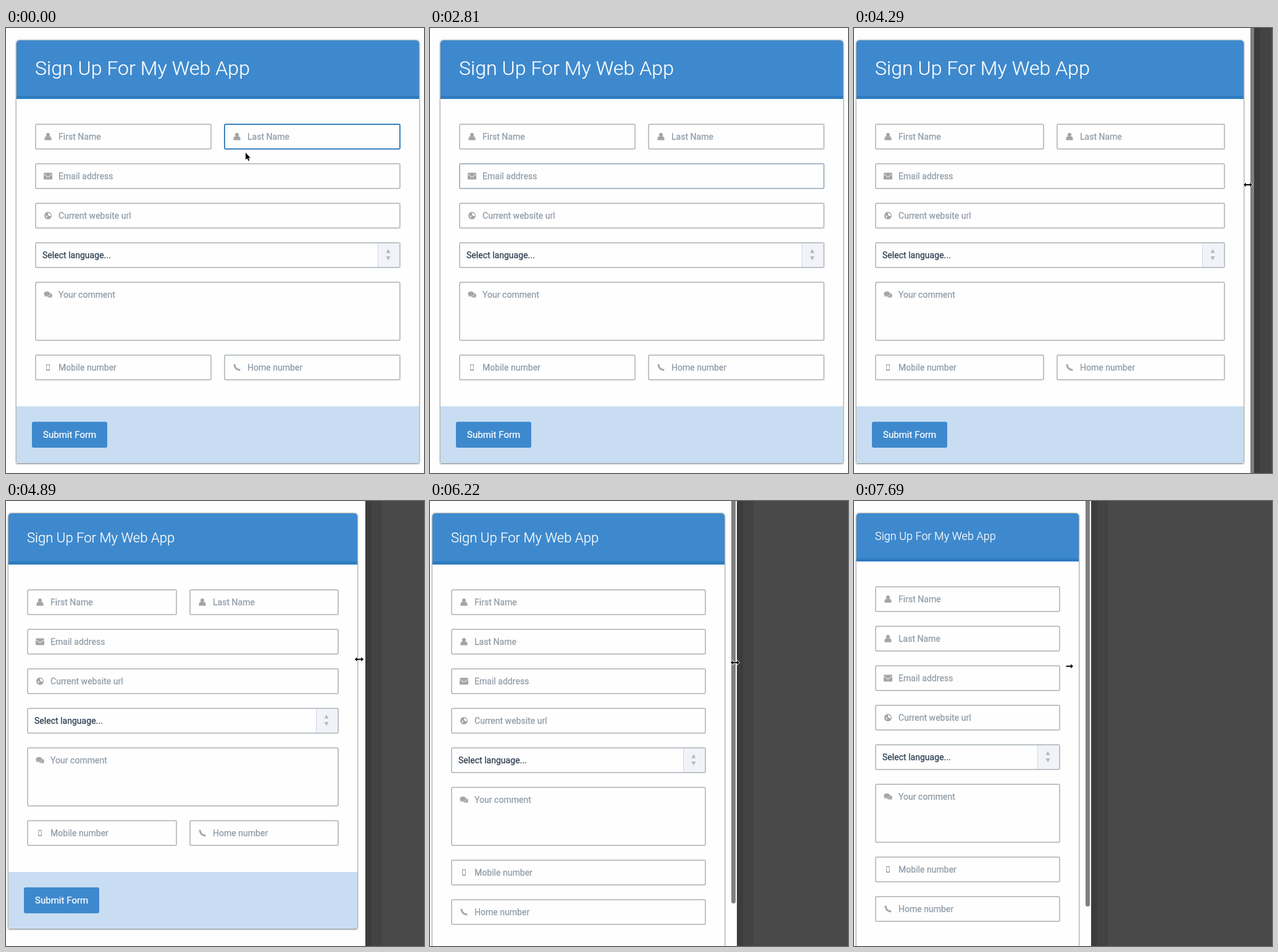
Animation, 677 px wide and 721 px high, one loop 8 s. Source, as an HTML page:

```html
<!DOCTYPE html>
<html lang="en">
<head>
<meta charset="utf-8">
<title>Responsive sign-up form</title>
<style>
  html, body { margin: 0; width: 100%; height: 100%; overflow: hidden; background: #fefefe; }
  svg { display: block; width: 100vw; height: 100vh; font: 14px Roboto, sans-serif; }
  text { stroke-width: .25px; letter-spacing: .002em; }
</style>
</head>
<body>
<svg viewBox="0 0 677 721">
  <defs>
    <filter id="shadow" x="-5%" y="-5%" width="110%" height="110%">
      <feDropShadow dx="0" dy="0.4" stdDeviation="1.4" flood-color="#000" flood-opacity=".8"/>
    </filter>
  </defs>
  <g id="page"></g>
  <g id="overlay"></g>
</svg>
<script>
const LOOP = 8000, TICK = 148, LAST = 52;
const PAPER = '#fefefe', BLUE = '#3e89cd';
const page = document.getElementById('page');
const overlay = document.getElementById('overlay');

const ICONS = {
  user: '<circle cy="-3" r="3.1"/><path d="M-5.5 5.8V3Q-5.5-.5-2-.5H2Q5.5-.5 5.5 3V5.8Z"/>',
  mail: `<rect x="-7" y="-5.5" width="14" height="11" rx="1.3"/><path d="M-7-3.4L0 1.8 7-3.4" fill="none" stroke="${PAPER}"/>`,
  globe: `<circle r="6"/><path d="M0-4.5L4-3 5 0 3 1 0-1ZM-4-1L-1 1-2 4Z" fill="${PAPER}"/>`,
  chat: `<ellipse cx="2" cy="1" rx="5" ry="3.5"/><path d="M3 4L7 5.4 5 2Z"/>
    <ellipse cx="-1.6" cy="-1.4" rx="5.4" ry="4" stroke="${PAPER}" stroke-width=".6"/><path d="M-5 1L-6.4 3.5-2 2Z"/>`,
  mobile: `<rect x="-3" y="-5.2" width="6" height="10.4" rx="1.2"/><rect x="-2" y="-3.7" width="4" height="7" fill="${PAPER}"/>`,
  phone: '<path d="M-4-4Q-3 3 4 4" fill="none" stroke="#a3a5a7" stroke-width="2.6"/><path d="M-5.8-4.6L-3.2-5.8-1.9-2.6-4-1ZM5.8 3.2L5 5.8 1 4.2 2.6 1.9Z"/>'
};

const CURSORS = {
  arrow: 'M0 0V11.5L2.6 9L4.5 13.2L6.3 12.4L4.5 8.4H8Z',
  both: 'M-7 0L-3.4-3.5V-1H3.4V-3.5L7 0L3.4 3.5V1H-3.4V3.5Z',
  right: 'M-5.5-1H2V-3.5L6 0L2 3.5V1H-5.5Z'
};

// Key points: [tick, ...values]
const POINTER = [[0, 388, 202], [4, 262, 178], [7, 262, 178], [12, 330, 238], [14, 330, 238], [19, 700, 245]];
const EDGE = [[25, 701, 686], [29, 648, 635], [33, 582, 573], [39, 539, 531], [41, 517, 501], [45, 437, 421], [50, 384, 368]];
const HOVER = { last: [-9, 0], first: [1, 8], email: [9, 16.5] };

const clamp = u => Math.max(0, Math.min(1, u));
const glowOf = ([enter, leave], k) => clamp((k - enter) / 3) * clamp(1 - (k - leave) / 3);

function at(track, k) {
  const i = track.findIndex(p => p[0] >= k);
  if (i < 1) return (i ? track[track.length - 1] : track[0]).slice(1);
  const a = track[i - 1], b = track[i], u = (k - a[0]) / (b[0] - a[0]);
  return a.map((v, j) => v + (b[j] - v) * u).slice(1);
}

const rect = (x, y, w, h, fill, more = '') =>
  `<rect x="${x}" y="${y}" width="${w}" height="${h}" fill="${fill}" ${more}/>`;
const text = (x, y, str, fill, more = '') =>
  `<text x="${x}" y="${y}" fill="${fill}" stroke="${fill}" ${more}>${str}</text>`;
const card = (x, y, w, bottom, more) =>
  `<path d="M${x} ${bottom}V${y + 5}q0-5 5-5h${w - 10}q5 0 5 5V${bottom}Z" ${more}/>`;

function frame(x, y, w, h, glow = 0) {
  const to = [60, 130, 190];
  const rgb = [189, 195, 199].map((v, i) => Math.round(v + (to[i] - v) * glow));
  return rect(x + 1, y + 1, w - 2, h - 2, PAPER, `rx="2" stroke="rgb(${rgb})" stroke-width="2"`);
}

function field(x, y, w, icon, label, glow = 0, h = 42) {
  return frame(x, y, w, h, glow) +
    `<g transform="translate(${x + 21} ${y + 21})" fill="#a3a5a7">${ICONS[icon]}</g>` +
    text(x + 38, y + 26, label, '#8f9ba6');
}

function select(x, y, w) {
  const r = x + w, c = r - 20;
  return frame(x, y, w, 42) +
    rect(r - 37, y + 2, 35, 38, '#f1f3f9') + rect(r - 37, y + 2, 1, 38, '#cfd6e4') +
    `<path fill="#b5babf" d="M${c - 3.5} ${y + 17.5}h7l-3.5-6.5zM${c - 3.5} ${y + 23}h7l-3.5 6.5z"/>` +
    text(x + 12, y + 26, 'Select language...', '#2c3e50');
}

function form(width, glow) {
  const cardW = Math.min(652, width - 8);
  const left = Math.round((width - cardW) / 2);
  const size = width >= 600 ? 32 : width > 370 ? 22 : 18;
  const wide = width >= 560;
  const top = 20, body = top + Math.round(56.6 + size * 1.2);
  const x = left + 30, w = cardW - 60, half = Math.floor((w - 20) / 2);
  let y = body + 40, fields = '';

  const add = (markup, h = 42) => { fields += markup; y += h + 22; };
  const pair = (a, b) => {
    if (wide) return add(field(x, y, w - 20 - half, ...a) + field(x + w - half, y, half, ...b));
    add(field(x, y, w, ...a));
    add(field(x, y, w, ...b));
  };
  pair(['user', 'First Name', glow.first], ['user', 'Last Name', glow.last]);
  add(field(x, y, w, 'mail', 'Email address', glow.email));
  add(field(x, y, w, 'globe', 'Current website url'));
  add(select(x, y, w));
  add(field(x, y, w, 'chat', 'Your comment', 0, 96), 96);
  pair(['mobile', 'Mobile number'], ['phone', 'Home number']);

  const foot = y + 20, end = foot + 92;
  const baseline = Math.round((top + body - 5) / 2 + size * .342);
  // The scrollbar thumb shows only when the content overflows
  const thumb = end + 20 > 721 ? rect(width + 7, -10, 7, wide ? 740 : 1483 - end, '#7f7f7f', 'rx="3.5"') : '';

  return card(left, top, cardW, end, `fill="${PAPER}" filter="url(#shadow)"`) +
    card(left, top, cardW, body, `fill="${BLUE}"`) +
    rect(left, body - 5, cardW, 5, '#2f7cc0') +
    text(x, baseline, 'Sign Up For My Web App', '#fff', `font-size="${size}" font-weight="300"`) +
    fields +
    rect(left, foot, cardW, 92, '#c8ddf1') +
    rect(left + 25, foot + 25, 122, 42, BLUE, 'rx="3"') +
    text(left + 43, foot + 51, 'Submit Form', '#fff', 'font-size="15"') +
    thumb;
}

const cursor = (kind, x, y) =>
  `<path transform="translate(${x} ${y})" d="${CURSORS[kind]}" ` +
  'stroke="#fff" stroke-width="1.6" stroke-linejoin="round" paint-order="stroke"/>';

function pointer(k, edge) {
  if (k < 19) return cursor('arrow', ...at(POINTER, k));
  if (k < 26) return '';
  // Past the narrowest width the hand goes on without the edge
  const past = Math.max(0, k - 50);
  const x = edge - (k < 42 ? 10 : 3) - past * 16;
  return cursor(past ? 'right' : 'both', x, 254 + (k - 29) * .6);
}

function draw(k) {
  const [edge, width] = at(EDGE, k).map(Math.round);
  const clock = k < 26 ? Math.min(k, 19) : k; // the fade pauses while the page is idle
  const glow = {};
  for (const name in HOVER) glow[name] = glowOf(HOVER[name], clock);
  page.innerHTML = form(width, glow);
  overlay.innerHTML =
    rect(edge, 0, 700, 721, '#3c3c3c') + rect(edge + 10, 0, 700, 721, '#434343') +
    rect(edge + 27, 0, 700, 721, '#494949') + pointer(k, edge);
}

let shown = -1;
const start = performance.now();
function loop(now) {
  const t = Math.max(0, now - start) % LOOP;
  const k = Math.min(LAST, Math.floor((t + 12) / TICK));
  if (k !== shown) draw(shown = k);
  requestAnimationFrame(loop);
}
draw(0);
requestAnimationFrame(loop);
</script>
</body>
</html>
```
